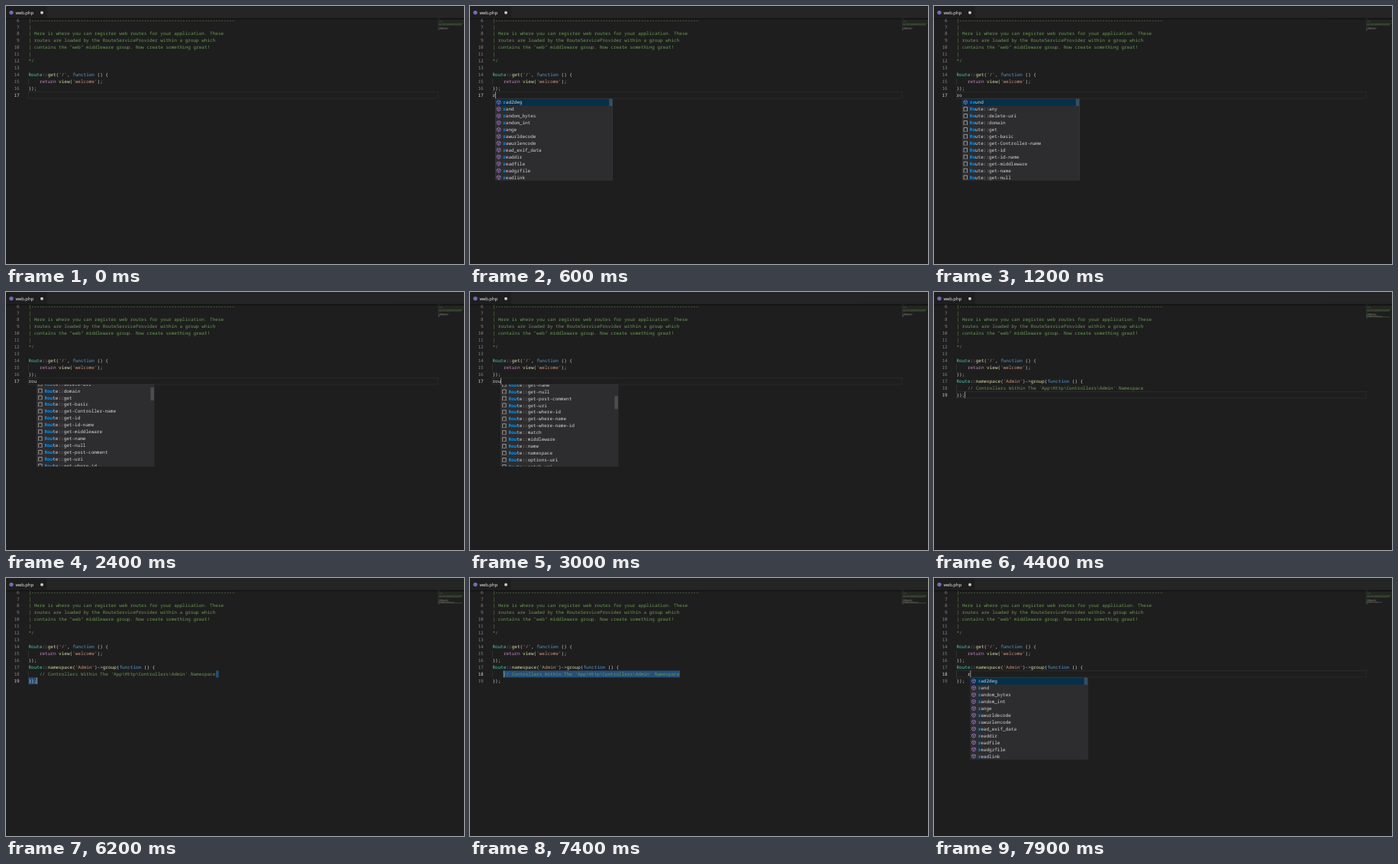
An HTML page that plays this animation: 600x338 px, repeating every 8000 ms.

```html
<!DOCTYPE html>
<html lang="en">
<head>
<meta charset="utf-8">
<title>Route editor</title>
<style>
  html, body { margin: 0; width: 100%; height: 100%; overflow: hidden; background: #1e1e1e; }
  svg { display: block; }
  #stage { width: 100vw; height: 100vh; }
  text { font: 6.016px "Noto Sans Mono", "DejaVu Sans Mono", monospace; white-space: pre; text-rendering: geometricPrecision; }
  .tab { font: 5.8px "Open Sans", sans-serif; fill: #fff; }
</style>
</head>
<body>
<svg id="stage" viewBox="0 0 600 338">
  <defs>
    <linearGradient id="shade" x2="0" y2="1">
      <stop stop-color="#000" stop-opacity=".6"/>
      <stop offset="1" stop-color="#000" stop-opacity="0"/>
    </linearGradient>
  </defs>
  <rect width="600" height="338" fill="#1e1e1e"/>
  <g id="under"></g>
  <g id="code"></g>
  <g id="map"></g>
  <rect y="15.6" width="600" height="2.4" fill="url(#shade)"/>
  <rect width="600" height="15.7" fill="#252526"/>
  <rect width="53.5" height="15.7" fill="#1e1e1e"/>
  <circle cx="7" cy="8.6" r="2.7" fill="#7468b8"/>
  <text class="tab" x="12.5" y="10.8">web.php</text>
  <circle cx="47" cy="8.7" r="2" fill="#c5c5c5"/>
  <g id="over"></g>
</svg>
<script>
const LOOP = 8000, CHAR = 3.61, ROW = 8.945, LEFT = 29.5;
const WIDE = 154.2, TALL = 107.3, WHEEL = 23.5;
const C = { doc: '#6a9955', type: '#4ec9b0', fn: '#dcdcaa', str: '#ce9178',
            key: '#569cd6', ctl: '#c586c0', txt: '#d4d4d4' };

const $ = id => document.getElementById(id);
const esc = s => s.replace(/&/g, '&amp;').replace(/</g, '&lt;').replace(/>/g, '&gt;');
const rect = (x, y, w, h, fill, more = '') =>
  `<rect x="${x}" y="${y}" width="${w}" height="${h}" fill="${fill}" ${more}/>`;
const colX = c => LEFT + c * CHAR;
const baseY = n => 119 + (n - 17) * ROW;
const topY = n => baseY(n) - 6.6;

// Each line is a list of [colour, text] pairs.
const doc = s => [[C.doc, s]];
const plain = s => [[C.txt, s]];
const dashes = doc('|' + '-'.repeat(74));
const HEAD = [
  [[C.key, '<?php']], [], doc('/*'), dashes, doc('| Web Routes'), dashes, doc('|'),
  doc('| Here is where you can register web routes for your application. These'),
  doc('| routes are loaded by the RouteServiceProvider within a group which'),
  doc('| contains the "web" middleware group. Now create something great!'),
  doc('|'), doc('*/'), [],
  [[C.type, 'Route'], [C.txt, '::'], [C.fn, 'get'], [C.txt, '('], [C.str, "'/'"], [C.txt, ', '],
   [C.key, 'function'], [C.txt, ' () {']],
  [[C.ctl, '    return'], [C.fn, ' view'], [C.txt, '('], [C.str, "'welcome'"], [C.txt, ');']],
  plain('});')
];
const GROUP = [[C.type, 'Route'], [C.txt, '::'], [C.fn, 'namespace'], [C.txt, '('], [C.str, "'Admin'"],
  [C.txt, ')->'], [C.fn, 'group'], [C.txt, '('], [C.key, 'function'], [C.txt, ' () {']];
const NOTE = "    // Controllers Within The 'App\\Http\\Controllers\\Admin' Namespace";

const FUNCS = ('rad2deg rand random_bytes random_int range rawurldecode rawurlencode ' +
  'read_exif_data readdir readfile readgzfile readlink').split(' ');
const ROUTES = ['round'].concat(('any delete-uri domain get get-basic get-Controller-name get-id get-id-name ' +
  'get-middleware get-name get-null get-post-comment get-uri get-where-id get-where-name get-where-name-id ' +
  'match middleware name namespace options-uri patch-uri post-Controller-name post-uri')
  .split(' ').map(s => 'Route::' + s));

const TICKS = [2200, 2500, 2700, 2900, 3200];
const ramp = (t, a, b, from, to) => from + (to - from) * Math.min(1, Math.max(0, (t - a) / (b - a)));

function stateAt(t) {
  const s = { tail: [[]], line: 17, col: 0, blink: -600, sel: null, list: null, hits: 0, scroll: 0 };
  if (t < 4000) {
    const typed = t < 500 ? '' : t < 700 ? 'r' : t < 1700 ? 'ro' : 'rou';
    s.tail = [plain(typed)];
    s.col = s.hits = typed.length;
    if (typed) {
      s.blink = [500, 700, 1700][s.col - 1];
      s.list = s.col > 1 ? ROUTES : FUNCS;
    }
    s.scroll = WHEEL * TICKS.filter(k => k <= t).length;
    return s;
  }
  const body = t < 7500 ? doc(NOTE) : plain(t < 7700 ? '    ' : '    r');
  s.tail = [GROUP, body, plain('});')];
  const end = NOTE.length;
  if (t < 5600) Object.assign(s, { line: 19, col: 3, blink: 4000 });
  else if (t < 5900) Object.assign(s, { line: 18, col: end, blink: 5600 });
  else if (t < 6300) Object.assign(s, { line: 19, col: 3, blink: 5900, sel: [[18, end, end + 1], [19, 0, 3]] });
  else if (t < 7500) {
    const col = Math.round(t < 6900 ? ramp(t, 6300, 6800, end, 15) : ramp(t, 6950, 7200, 15, 4));
    Object.assign(s, { line: 18, col, blink: Math.min(t, 7200), sel: [[18, col, end]] });
  }
  else if (t < 7700) Object.assign(s, { line: 18, col: 4, blink: 7500 });
  else Object.assign(s, { line: 18, col: 5, blink: 7700, list: FUNCS, hits: 1 });
  return s;
}

const codeLine = (parts, n) => `<text x="${LEFT}" y="${baseY(n)}">` +
  parts.map(([c, s]) => `<tspan fill="${c}">${esc(s)}</tspan>`).join('') + '</text>';

function mapLine(parts, n) {
  let col = 0, out = '';
  for (const [c, s] of parts) {
    for (const m of s.matchAll(/\S+/g)) {
      const faint = m[0].includes('---') ? .15 : .5;
      out += rect(566.3 + (col + m.index) * .455, 15.8 + (n - 1) * .98, m[0].length * .455, .75, c, `opacity="${faint}"`);
    }
    col += s.length;
  }
  return out;
}

function icon(cube, y) {
  return cube
    ? `<path d="M4.6 ${y - 2.7}l2.4 1.2v2.8l-2.4 1.4l-2.4-1.4v-2.8zM2.2 ${y - 1.5}l2.4 1.2l2.4-1.2M4.6 ${y - .3}v3" fill="none" stroke="#b180d7" stroke-width=".65"/>`
    : `<path d="M2.4 ${y + 2.4}v-4.9h4.5v4.9" fill="none" stroke="#c5c5c5" stroke-width=".7"/>` +
      `<path d="M2.1 ${y + 2.4}h5.1" stroke="#c5c5c5" stroke-width=".7" stroke-dasharray=".8 .6"/>`;
}

function popup(s) {
  const x = colX(s.col) - .1, y = topY(s.line + 1) - .1;
  let out = `<svg x="${x}" y="${y}" width="${WIDE}" height="${TALL}">` + rect(0, 0, WIDE, TALL, '#2d2d30');
  s.list.forEach((name, i) => {
    const top = .4 + i * ROW - s.scroll;
    if (top < -ROW || top > TALL) return;
    if (!i) out += rect(0, top, WIDE, ROW, '#062f4a');
    out += icon(!name.includes('::'), top + 4.5) +
      `<text x="10.2" y="${top + 6.6}" fill="${C.txt}"><tspan fill="#0097fb" font-weight="bold">` +
      `${name.slice(0, s.hits)}</tspan>${esc(name.slice(s.hits))}</text>`;
  });
  const long = s.hits === 3;
  out += rect(WIDE - 5, long ? s.scroll * .16 : .4, 4.6, long ? 17 : 9.3, '#797979', 'opacity=".42"');
  return out + rect(.25, .25, WIDE - .5, TALL - .5, 'none', 'stroke="#454545" stroke-width=".5"') + '</svg>';
}

let last = '';
function render(t) {
  const s = stateAt(t);
  const lit = (t - s.blink) % 1000 < 500;
  const key = JSON.stringify([s, lit]);
  if (key === last) return;
  last = key;

  const lines = HEAD.concat(s.tail);
  let under = '', code = '', map = '';
  if (s.sel) {
    for (const [n, a, b] of s.sel) under += rect(colX(a), topY(n), (b - a) * CHAR, ROW, '#264f78');
  } else {
    under += rect(LEFT, topY(s.line) + .2, 536.5, ROW - .5, 'none', 'stroke="#2e2e2e" stroke-width=".7"');
  }
  for (const n of [15, 18]) {
    if (n < lines.length) under += rect(LEFT, topY(n), .5, ROW, '#404040');
  }
  lines.forEach((parts, i) => {
    const n = i + 1;
    map += mapLine(parts, n);
    if (n < 6) return;
    const on = n === s.line;
    code += `<text x="17.6" y="${baseY(n)}" text-anchor="end" fill="${on ? '#d6d6d6' : '#858585'}">${n}</text>`;
    code += codeLine(parts, n);
  });
  if (lit) code += rect(colX(s.col) - .1, topY(s.line) + .1, .8, ROW - .3, '#aeafad');
  $('under').innerHTML = under;
  $('code').innerHTML = code;
  $('map').innerHTML = map;
  $('over').innerHTML = s.list ? popup(s) : '';
}

const start = performance.now();
function tick() {
  render((performance.now() - start) % LOOP);
  requestAnimationFrame(tick);
}
render(0);
requestAnimationFrame(tick);
</script>
</body>
</html>
```
